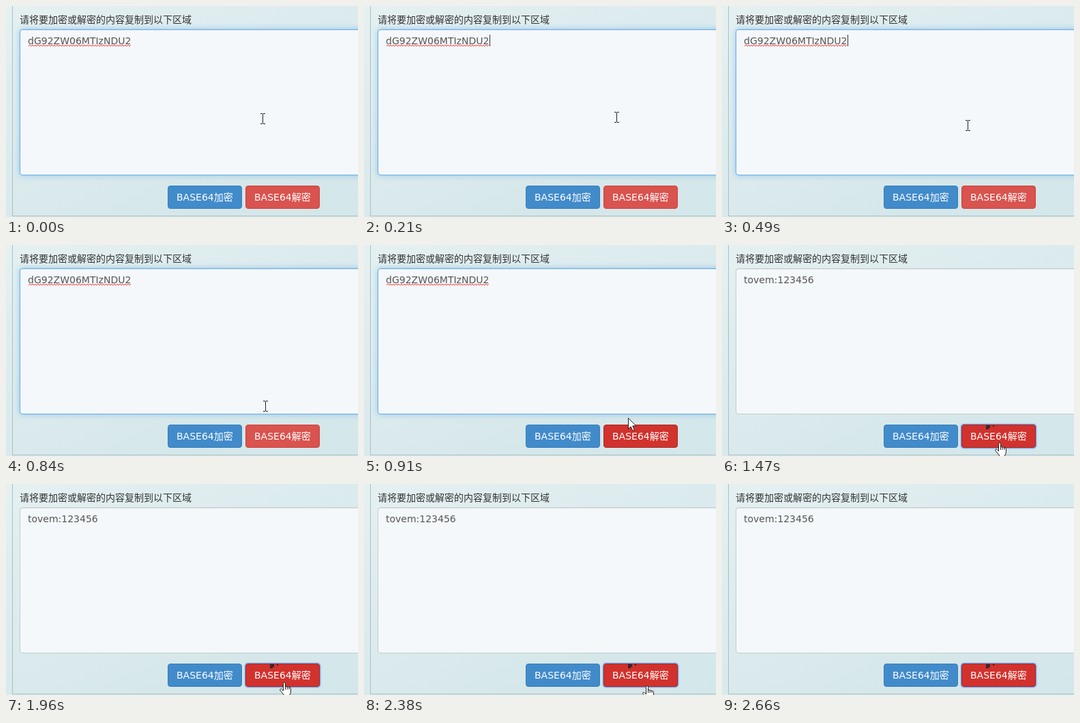
Animation, 516 px wide and 309 px high, one loop 3150 ms. Source, as an HTML page:

```html
<!DOCTYPE html>
<html lang="zh">
<head>
<meta charset="utf-8">
<style>
html, body { margin: 0; width: 100%; height: 100%; overflow: hidden; }
body { position: relative; background: linear-gradient(155deg, #e5f0f1, #dcebee 40%, #d6e7ea 75%, #d3e7ea); }
div, svg { position: absolute; box-sizing: border-box; }
svg { left: 0; top: 0; }
.panel { left: 9px; top: -9px; width: 530px; height: 317px; border: 1px solid #a9c0c4; }
.field {
  left: 20px; top: 34px; width: 520px; height: 214px; border: 1px solid #c4cccf; border-radius: 4px;
  background: #f4f8fb; box-shadow: inset 0 1px 1px #00000013;
}
.field.focus { border-color: #66afe9; box-shadow: inset 0 1px 1px #00000013, 0 0 8px #66afe999; }
.button { top: 263px; height: 34px; border: 1px solid; border-radius: 4px; }
.encode { left: 237px; width: 109px; background: #428bca; border-color: #357ebd; }
.decode { left: 351px; width: 109px; background: #d9534f; border-color: #d43f3a; }
.decode.hover { background: #d2322d; border-color: #ac2925; }
.decode.focus { box-shadow: 0 0 0 1px #72a3ea, 0 0 2px 1px #72a3ea; }
text { font: 14px "DejaVu Sans", "Noto Sans CJK SC", "Noto Sans CJK", sans-serif; fill: #555; white-space: pre; }
.label { font-family: "Noto Sans CJK SC", "Noto Sans CJK", sans-serif; fill: #333; }
.white { fill: #fff; }
.shape { fill: #fff; stroke: #222; stroke-linejoin: round; }
</style>
</head>
<body>
<div class="panel"></div>
<div class="field" id="field"></div>
<div class="button encode"></div>
<div class="button decode" id="decode"></div>
<svg width="516" height="309">
  <text class="label" x="20" y="25">请将要加密或解密的内容复制到以下区域</text>
  <text id="value" x="32" y="56"></text>
  <path id="squiggle" fill="none" stroke="#f22" stroke-width=".9"/>
  <path id="caret" d="M184.5 42v17" stroke="#333"/>
  <text class="white" x="250" y="285">BASE64加密</text>
  <text class="white" x="364" y="285">BASE64解密</text>
  <path id="trail" fill="#35292d" d="M387 264h6v4h-2v2h-4zM397 264h2v2h-2z"/>
  <path id="trailTip" fill="#35292d" d="M387 263h12v1h-1v3h-2v-2h-9z"/>
  <g id="beam"><path d="M-3 -7.5h3M1 -7.5h3M-3 7.5h3M1 7.5h3M.5 -7v14" stroke="#222"/></g>
  <g id="arrow"><path class="shape" d="M.5 .5v16l3.7-3.5 2.5 5.8 2.6-1.1-2.5-5.7h5z"/></g>
  <g id="hand">
    <path class="shape" d="M5.5 13V2.5q0-2 1.5-2t1.5 2V8q0-1.5 1.3-1.5T11.2 8q.2-1 1.4-1T14 8.7q.2-.9 1.2-.8t1.3 1.6V14q0 3-2 5v2.5h-8V19L1 12.5q-.8-1.7.4-2.3t2.3.7z"/>
    <path d="M8.5 8v3M11.2 8v3M14 8.7v2.3" stroke="#222"/>
  </g>
</svg>
<script>
const LOOP = 3150;
const $ = id => document.getElementById(id);
const show = (id, on) => $(id).style.display = on ? '' : 'none';

// time, pointer, x, y; each pose holds until the next
const poses = [
  [0, 'beam', 376, 165], [70, 'beam', 375, 165], [140, 'beam', 373, 164],
  [210, 'beam', 370, 163], [280, 'beam', 367, 163], [350, 'beam', 365, 164],
  [490, 'beam', 360, 175], [560, 'beam', 361, 186], [700, 'beam', 365, 201],
  [770, 'beam', 372, 218], [840, 'beam', 380, 236], [910, 'arrow', 387, 253],
  [980, 'hand', 391, 271], [1050, 'hand', 397, 283], [1120, 'hand', 400, 289],
  [1960, 'hand', 401, 290], [2100, 'hand', 402, 291], [2380, 'hand', 408, 295],
  [2450, 'hand', 420, 300], [2520, 'hand', 433, 307], [2660, 'none', 0, 0]
];

let wave = 'M33 59';
for (let x = 35; x <= 183; x += 2) wave += `L${x} ${x % 4 === 3 ? 57 : 59}`;
$('squiggle').setAttribute('d', wave);

function draw() {
  const t = performance.now() % LOOP;
  const decoded = t >= 1470;
  const [, pointer, x, y] = poses.findLast(pose => pose[0] <= t);

  for (const id of ['beam', 'arrow', 'hand']) show(id, id === pointer);
  if (pointer !== 'none') $(pointer).setAttribute('transform', `translate(${x} ${y})`);

  $('value').textContent = decoded ? 'tovem:123456' : 'dG92ZW06MTIzNDU2';
  $('field').classList.toggle('focus', !decoded);
  $('decode').classList.toggle('hover', t >= 910);
  $('decode').classList.toggle('focus', decoded);
  show('squiggle', !decoded);
  show('caret', t >= 70 && t < 560 || t >= 1050 && !decoded);
  show('trail', t >= 980);
  show('trailTip', t >= 980 && !decoded);
  requestAnimationFrame(draw);
}
draw();
</script>
</body>
</html>
```
